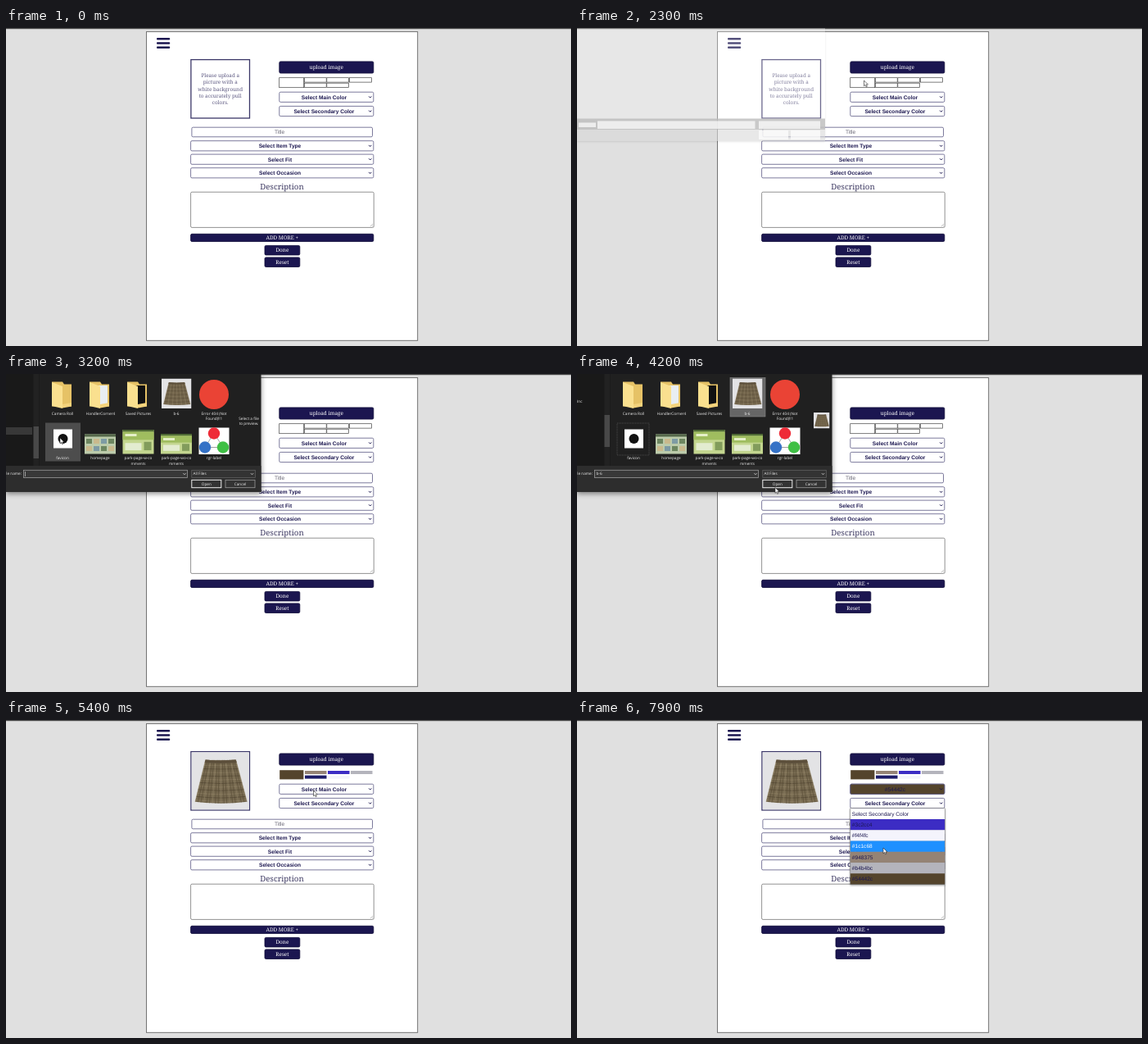
An HTML page that plays this animation: 690x388 px, repeating every 8 s.

```html
<!DOCTYPE html>
<html lang="en">
<head>
<meta charset="utf-8">
<title>Add item form</title>
<style>
  html, body { margin: 0; width: 100%; height: 100%; overflow: hidden; background: #e0e0e0; }
  svg { display: block; width: 690px; height: 388px; }
  text {
    font: 6.6px "Liberation Sans", sans-serif; fill: #1c1750;
    text-anchor: middle; text-rendering: geometricPrecision;
  }
  .bold { font-weight: bold; }
  .serif { font: 6.4px "Noto Serif", serif; }
  .hint { font-size: 6.3px; fill: #5c5880; }
  .heading { font-size: 9.7px; fill: #3b3760; }
  .faint { fill: #666472; }
  .light { fill: #fff; }
  .ui { font: 4.7px "Open Sans", sans-serif; fill: #eee; }
  .left { text-anchor: start; }
  .right { text-anchor: end; }
  .menu { filter: drop-shadow(0 1px 1px #0006); }
  .window { filter: drop-shadow(0 2px 3px #0007); }
</style>
</head>
<body>
<svg viewBox="0 0 690 388">
  <defs><symbol id="skirt" viewBox="0 0 72 72"></symbol></defs>
  <g id="page"></g>
  <g id="scene"></g>
</svg>
<script>
const NAVY = '#1b1650', INK = '#5b5883', BROWN = '#54442c';
const swatches = ['#3c2cc4', '#f4f4fc', '#1c1c68', '#948375', '#b4b4bc', BROWN];
const byId = id => document.getElementById(id);
const range = n => [...Array(n).keys()];

const rect = (x, y, w, h, fill, more = '') =>
  `<rect x="${x}" y="${y}" width="${w}" height="${h}" fill="${fill}" ${more}/>`;
const outline = (x, y, w, h, stroke = INK, width = .8, fill = '#fff') =>
  rect(x, y, w, h, fill, `stroke="${stroke}" stroke-width="${width}" rx="1.5"`);
const text = (x, y, s, cls = '') => `<text x="${x}" y="${y}" dy=".35em" class="${cls}">${s}</text>`;
const path = (d, fill, more = '') => `<path d="${d}" fill="${fill}" ${more}/>`;
const circle = (x, y, r, fill) => `<circle cx="${x}" cy="${y}" r="${r}" fill="${fill}"/>`;
const chevron = (x, y, color) => path(`M${x - 1.6} ${y - .9}l1.6 1.7 1.6-1.7`, 'none', `stroke="${color}"`);
const skirt = (x, y, size) => `<use href="#skirt" x="${x}" y="${y}" width="${size}" height="${size}"/>`;

const button = (x, y, w, h, s) =>
  outline(x, y, w, h, '#0f0b38', .8, NAVY) + text(x + w / 2, y + h / 2, s, 'serif light');
const select = (x, y, w, s, textX, fill = '#fff', cls = 'bold') =>
  outline(x, y, w, 12.2, INK, .8, fill) + text(textX, y + 6.2, s, cls) + chevron(444.7, y + 6.1, NAVY);

function skirtArt() {
  const left = v => 17.5 - 13 * v, right = v => 55.5 + 14 * v;
  let art = rect(0, 0, 72, 72, '#e3e3e5') + path('M17.5 9.5Q36 11 55.5 9.5L69.5 62Q37 66 4.5 62Z', '#75684f');
  range(12).forEach(i => {
    const v = (i + .6) / 12, y = 9.5 + 52 * v;
    art += path(`M${left(v)} ${y}Q36 ${y + 4 * v} ${right(v)} ${y}`, 'none',
      `stroke="${i % 2 ? '#948669' : '#4c412f'}" opacity=".6"`);
  });
  range(19).forEach(i => {
    const u = i / 18;
    art += path(`M${17.5 + 38 * u} 9.5L${4.5 + 65 * u} ${62 + 8 * u * (1 - u)}`, 'none',
      `stroke="${i % 3 ? '#51452f' : '#948669'}" stroke-width=".9" opacity=".6"`);
  });
  return art + path('M17.5 9.5Q36 11 55.5 9.5L56.5 13Q36 15 16.5 13Z', '#5d503c');
}

function pageArt() {
  const hint = ['Please upload a', 'picture with a', 'white background', 'to accurately pull', 'colors.'];
  const cells = [[333.7, 60.7, 30, 12], [364.6, 60.7, 26.6, 5.4], [391.8, 60.7, 26.8, 5.4],
    [419.4, 60.7, 27, 5.4], [364.6, 67.2, 26.6, 5.4], [391.8, 67.2, 26.8, 5.4]];
  return rect(0, 0, 690, 388, '#e0e0e0') + rect(0, 0, 690, 1.2, '#444') +
    rect(171.5, 4.6, 331.2, 376.7, '#fff', 'stroke="#666" stroke-width=".9"') +
    [12, 17.2, 22.6].map(y => rect(184, y, 16.2, 2.5, NAVY, 'rx="1"')).join('') +
    rect(225.9, 38.6, 71.6, 71.4, '#fff', 'stroke="#3b3768" stroke-width="1.3"') +
    hint.map((s, i) => text(261.7, 58 + 8.2 * i, s, 'serif hint')).join('') +
    button(333.8, 40.9, 115, 14.2, 'upload image') +
    cells.map(c => rect(...c, '#fff', 'stroke="#444" stroke-width=".7"')).join('') +
    select(333.8, 78.2, 115, 'Select Main Color', 388.4) +
    select(333.8, 95.4, 115, 'Select Secondary Color', 388.4) +
    outline(226.9, 121.2, 220.6, 11.6) + text(334, 127.1, 'Title', 'faint') +
    select(225.6, 137.7, 223.2, 'Select Item Type', 334.5) +
    select(225.6, 154.1, 223.2, 'Select Fit', 334.5) +
    select(225.6, 170.7, 223.2, 'Select Occasion', 334.5) +
    text(337, 193.7, 'Description', 'serif heading') +
    outline(225.6, 200.2, 223.6, 43.2, '#777') +
    path('M445 242l3-3M447 242l1-1', 'none', 'stroke="#888" stroke-width=".5"') +
    button(225.6, 251.3, 223.2, 9.2, 'ADD MORE +') +
    button(316, 265.4, 42.8, 11.6, 'Done') + button(316, 279.9, 42.8, 11.6, 'Reset');
}

const resultArt = () =>
  skirt(226.6, 39.3, 70.2) + rect(333, 60, 115, 13.5, '#fff') +
  rect(334.2, 61.2, 29.2, 11.2, BROWN) +
  [[365, 62, 3], [393, 62, 0], [421, 62, 4], [365, 67.6, 2], [393, 67.6, 1]]
    .map(([x, y, i]) => rect(x, y, 26.5, 4, swatches[i])).join('');

function menu(top, title, pointerY) {
  const rowHeight = 13.25, hovered = Math.floor((pointerY - top) / rowHeight);
  const rows = [title, ...swatches].map((s, i) => {
    const on = i === hovered, y = top + i * rowHeight;
    return rect(333.8, y, 115.4, rowHeight + .1, on ? '#1e90ff' : i ? s : '#fff') +
      text(335.8, y + 6.5, s, on ? 'left light' : 'left');
  });
  return `<g class="menu">${rows.join('')}` +
    rect(333.8, top, 115.4, rowHeight * 7, 'none', 'stroke="#777" stroke-width=".5"') + '</g>';
}

function folder(x, sheet) {
  return path(`M${x - 13} 9.5h13l2 3h9v27h-24z`, '#e6c266') +
    (sheet ? rect(x - 3, 14, 12, 24, sheet) : '') +
    path(`M${x - 13} 10l13 5v27l-13-3z`, '#fae08f') + path(`M${x} 37l11-2v4.5l-11 2z`, '#f4d37c');
}

function webShot(x, y, h) {
  return rect(x, y, 38, h, '#c3d68f') + rect(x, y, 38, 2.5, '#4f6a35') +
    rect(x, y + 2.5, 38, h / 3, '#9fbd5f') + rect(x + 3, y + 5, 14, 3, '#e4efc8') +
    rect(x + 3, y + h * .55, 20, h * .3, '#e3ecd0') + rect(x + 26, y + h * .5, 9, h * .35, '#829c5c');
}

function homeShot() {
  const tones = ['#6d8660', '#c9b98c', '#7e9ba4'];
  return rect(96, 73.5, 38, 24, '#bccbab') + rect(96, 73.5, 38, 3, '#55684a') +
    range(8).map(i => rect(98 + i % 4 * 9, 79 + (i >> 2) * 9, 7, 6, tones[i % 3])).join('');
}

function dialog(t) {
  const picked = t >= 3700, hoverIcon = t >= 3000 && t < 3400, scrolled = t >= 3400;
  const names = [[69, 48, 'Camera Roll'], [115.5, 48, 'HandlerCorner4'], [161.5, 48, 'Saved Pictures'],
    [208, 48, 'b-6'], [254, 48, 'Error 404 (Not'], [254, 54.6, 'Found)!!1'], [69, 102.6, 'favicon'],
    [115, 102.6, 'homepage'], [161.5, 102.6, 'park-page-w-co'], [161.5, 109, 'mments'],
    [208, 102.6, 'park-page-wo-co'], [208, 109, 'mments'], [254, 102.6, 'rgr-label']];
  return '<g class="window">' + rect(0, 0, 311.5, 143.8, '#202020') + rect(0, 0, 40.5, 112, '#191919') +
    (scrolled ? text(0, 33, 'Inc', 'ui left') : rect(0, 65, 32, 9, '#383838')) +
    rect(33.5, 0, 6.5, 112, '#222') + rect(33.5, scrolled ? 50 : 64, 6.5, 39, '#484848') +
    rect(0, 112, 311.5, 31.8, '#2d2d2d') +
    (hoverIcon ? rect(48, 59.5, 43, 47, '#4d4d4d') : '') +
    (picked ? rect(49, 60, 39, 39, 'none', 'stroke="#777" stroke-width=".5" stroke-dasharray="1"') +
      rect(187, 4.5, 43, 47.5, '#666', 'stroke="#888" stroke-width=".6"') : '') +
    folder(69) + folder(115, '#e9eef2') + folder(161, '#111') + skirt(190, 5.5, 36.5) +
    circle(254, 25, 18, '#ea4335') +
    rect(58, 67.5, 23, 23, '#fff') + circle(69.5, 79, 6, '#111') +
    homeShot() + webShot(142.5, 68, 29.5) + webShot(189, 73, 24.5) +
    rect(235.5, 65.5, 37, 32.5, '#fff') + path('M254 72L243 89.5H265Z', 'none', 'stroke="#777" stroke-width=".7"') +
    circle(254, 72.5, 7.2, '#ee2b37') + circle(243, 89.5, 7.2, '#3572c6') + circle(265, 89.5, 7.2, '#3fbf45') +
    names.map(n => text(...n, 'ui')).join('') +
    (picked ? skirt(289, 47, 19.5)
      : text(296.5, 54, 'Select a file', 'ui') + text(296.5, 60.5, 'to preview.', 'ui')) +
    text(19, 121.7, 'File name:', 'ui right') +
    rect(21.5, 117.3, 200, 9.2, '#383838', 'stroke="#999" stroke-width=".8"') +
    (picked ? text(23.5, 121.7, 'b-6', 'ui left') : rect(23, 119, .5, 6, '#fff')) + chevron(218, 122, '#bbb') +
    rect(226.8, 117.3, 77.5, 9.2, '#333', 'stroke="#666" stroke-width=".7"') +
    text(228.5, 121.7, 'All Files', 'ui left') + chevron(300.5, 122, '#bbb') +
    rect(226.8, 129.3, 36, 9.4, '#333', 'stroke="#eee"') + text(244.8, 134, 'Open', 'ui') +
    rect(268, 129.3, 36, 9.4, '#333', 'stroke="#999" stroke-width=".8"') + text(286, 134, 'Cancel', 'ui') + '</g>';
}

// Pale dialog shell seen while the window is opening
const dialogShell = () =>
  rect(0, 0, 303, 138, '#fff', 'opacity=".25" class="menu"') +
  rect(0, 110.5, 303, 13.5, '#bcbcbc', 'opacity=".8"') + rect(0, 124, 303, 14, '#ccc', 'opacity=".45"') +
  [[2, 115.5, 21, 5.5], [25, 113.5, 192.5, 9.5], [222, 113.5, 75, 9.5], [222, 125, 36, 11], [261, 125, 36, 11]]
    .map(b => rect(...b, '#fff', 'opacity=".7"')).join('');

const route = [[400, 694, 287], [1300, 411, 50], [1600, 411, 50], [2200, 350.5, 64], [2500, 350.5, 64],
  [3100, 66, 78], [3300, 66, 78], [3600, 212, 28], [3800, 212, 28], [4100, 242, 138.5], [4400, 242, 138.5],
  [5300, 375.5, 86], [5700, 375.5, 86], [6400, 371.5, 176], [6900, 371.5, 176], [7300, 380, 101],
  [7500, 380, 101], [7800, 374, 156], [8000, 374, 156]];

function pointerAt(t) {
  const i = route.findIndex(stop => stop[0] > t);
  if (i < 1) return route[0].slice(1);
  const [t0, x0, y0] = route[i - 1], [t1, x1, y1] = route[i];
  const u = (t - t0) / (t1 - t0), k = u * u * (3 - 2 * u);
  return [x0 + (x1 - x0) * k, y0 + (y1 - y0) * k];
}

function sceneAt(t) {
  const [x, y] = pointerAt(t);
  let art = '';
  if (t >= 4700) art += resultArt();
  if (t >= 7000) art += select(333.8, 78.2, 115, BROWN, 388.4, BROWN, '');
  if (t >= 5700 && t < 7000) art += menu(90.6, 'Select Main Color', y);
  if (t >= 7400) art += menu(107.8, 'Select Secondary Color', y);
  if (t >= 2200 && t < 2400) art += dialogShell();
  if (t >= 2400 && t < 4500) art += dialog(t);
  return art + path(`M${x} ${y}v6.8l1.6-1.4 1.1 2.4 1.2-.6-1.1-2.3h2.1z`, '#fff', 'stroke="#222" stroke-width=".6"');
}

byId('skirt').innerHTML = skirtArt();
byId('page').innerHTML = pageArt();
let shown = -1;
function draw() {
  const t = Math.floor(performance.now() % 8000 / 100) * 100;
  if (t !== shown) byId('scene').innerHTML = sceneAt(shown = t);
  requestAnimationFrame(draw);
}
draw();
</script>
</body>
</html>
```
